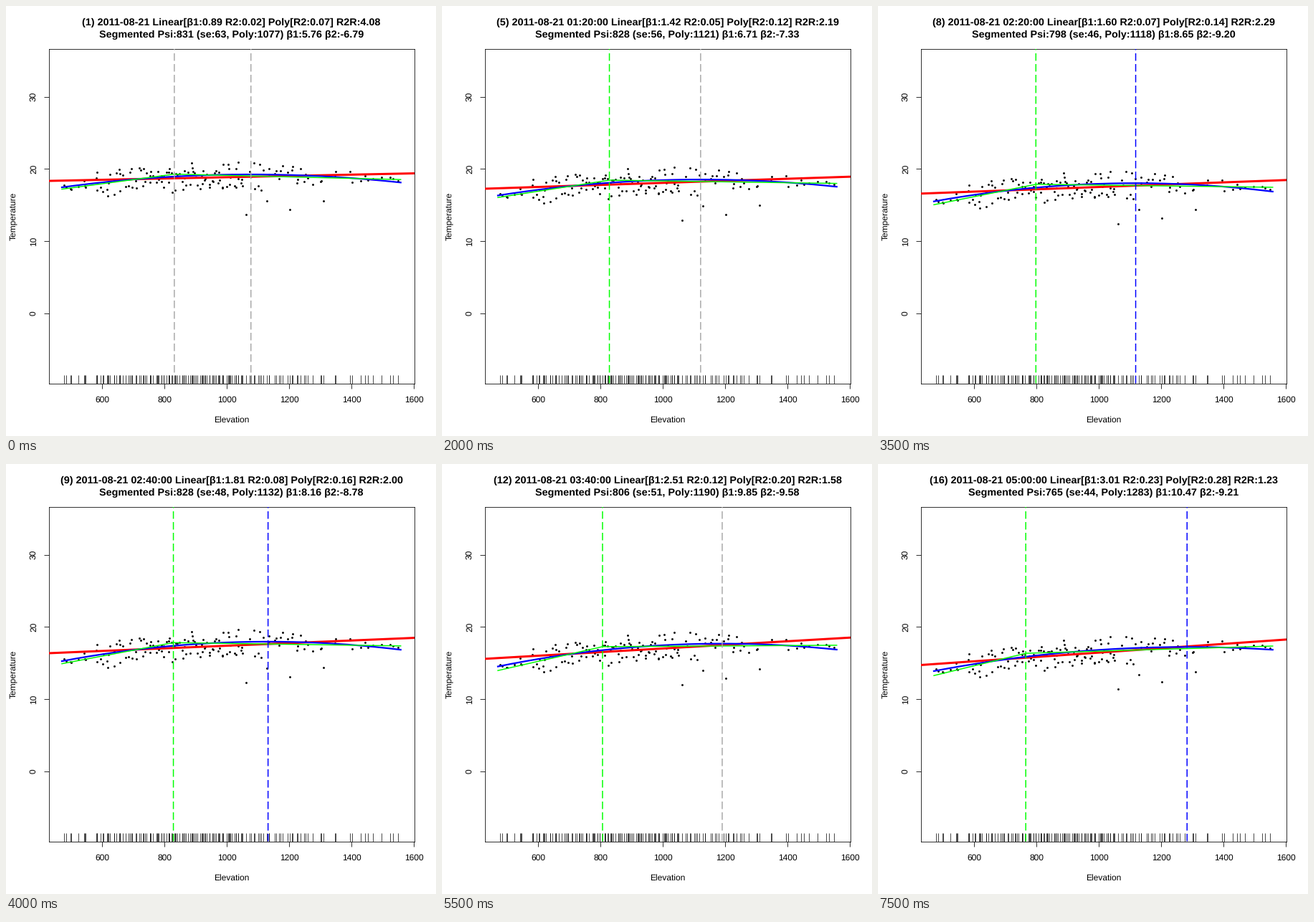
A matplotlib script for the animation above (8 s loop, 600 px wide and 600 px high).

```python
import numpy as np
import matplotlib.pyplot as plt
from matplotlib.animation import FuncAnimation

PT = 0.72                          # points per pixel at 100 dpi
L, R, T, B = 59.5, 569.5, 59.5, 526.5
W, H = R - L, B - T
STEPS = 16
CENTER, SPREAD = 985, 272          # where the two smooth fits balance

plt.rcParams["font.family"] = ["Liberation Sans", "DejaVu Sans"]
plt.rcParams["text.hinting"] = "none"

# Fit results: step, level, linear slope, R2, poly R2, R2R,
# psi, se, poly vertex, first slope, change of slope
FITS = np.array([
    [1, 18.84, 0.89, .02, .07, 4.08, 831, 63, 1077, 5.76, -6.79],
    [5, 18.05, 1.42, .05, .12, 2.19, 828, 56, 1121, 6.71, -7.33],
    [7, 17.58, 1.39, .05, .12, 2.57, 767, 43, 1104, 9.14, -9.61],
    [9, 17.37, 1.81, .08, .16, 2.00, 828, 48, 1132, 8.16, -8.78],
    [11, 17.16, 2.25, .12, .22, 1.75, 766, 38, 1154, 11.08, -10.93],
    [14, 16.61, 3.02, .13, .17, 1.25, 886, 77, 1263, 7.38, -6.89],
    [16, 16.40, 3.01, .23, .28, 1.23, 765, 44, 1283, 10.47, -9.21],
])

# Stations crowd the middle elevations; each keeps its own deviation
rng = np.random.default_rng(21)
count = 150
rank = np.linspace(0, 1, count) + rng.uniform(-1, 1, count) / count
elev = np.interp(rank, [0, .06, .25, .7, .8, .9, 1],
                 [470, 580, 748, 1045, 1150, 1270, 1558])
taper = np.interp(elev, [470, 560, 1150, 1300, 1560], [.2, 1, 1, .6, .35])
deviation = taper * (4.2 * rng.beta(1.8, 1.5, count) - 2.3)

# The cold spots
for e, d in [(1061, -5.6), (1202, -4.8), (1128, -3.7), (1310, -3.4), (1110, -2.2)]:
    i = np.argmin(abs(elev - e))
    elev[i], deviation[i] = e, d


def linear_fit(e, level, slope):
    return level + slope * (e - CENTER) / 1000


def poly_fit(e, level, slope, vertex):
    bend = slope / 2000 / (vertex - CENTER)
    return linear_fit(e, level, slope) + bend * (SPREAD ** 2 - (e - CENTER) ** 2)


def segmented_fit(e, level, slope, psi, b1, b2):
    def shape(x):
        return (b1 * (x - psi) + b2 * np.maximum(x - psi, 0)) / 1000
    return shape(e) + np.mean(linear_fit(elev, level, slope) - shape(elev))


fig = plt.figure(figsize=(6, 6), dpi=100, facecolor="white")
ax = fig.add_axes([L / 600, 1 - B / 600, W / 600, H / 600])
ax.set_xlim(427.4, 1601.2)
ax.set_ylim(-9.715, 36.675)
ax.set_xticks(range(600, 1601, 200))
ax.set_yticks(range(0, 31, 10))
ax.tick_params(length=7.2 * PT, width=0.8 * PT, labelbottom=False, labelleft=False)
for spine in ax.spines.values():
    spine.set_linewidth(0.8 * PT)

along_x, along_y = ax.get_xaxis_transform(), ax.get_yaxis_transform()


def label(x, y, s="", size=12, transform=ax.transAxes, **kw):
    return ax.text(x, y, s, fontsize=size * PT, transform=transform, ha="center",
                   va="baseline", rotation_mode="anchor", **kw)


def line(color, width):
    return ax.plot([], [], color=color, lw=width * PT, zorder=3, snap=False)[0]


def marker_line():
    return ax.axvline(0, lw=1.5 * PT, ls=(0, (7, 3)), dash_capstyle="butt",
                      zorder=4, snap=False)


for e in ax.get_xticks():
    label(e, -26 / H, f"{e:.0f}", transform=along_x)
for t in ax.get_yticks():
    label(-17.7 / W, t, f"{t:.0f}", transform=along_y, rotation=90)
label(.5, -54.8 / H, "Elevation")
label(-45.9 / W, .5, "Temperature", rotation=90)
title = [label(.5, 1 + up / H, size=14.4, weight="bold") for up in (32.5, 15.2)]

ax.vlines(elev, 0, .025, transform=along_x, color="black", lw=0.7 * PT)
dots = ax.plot([], [], "o", color="black", ms=2.9 * PT, mew=0, zorder=2)[0]
linear, poly, segmented = line("#ff0000", 3), line("#0000ff", 2.25), line("#00ff00", 1.5)
psi_line, vertex_line = marker_line(), marker_line()
span = np.linspace(470, 1558, 200)


def draw(i):
    step = i + 1
    level, slope, r2, pr2, r2r, psi, se, vertex, b1, b2 = (
        np.interp(step, FITS[:, 0], col) for col in FITS.T[1:])

    x, y = elev, poly_fit(elev, level, slope, vertex) + deviation
    if step == 14:                 # one faulty reading
        x, y = np.append(x, 747), np.append(y, -0.4)
    dots.set_data(x, y)

    ends = np.array(ax.get_xlim())
    linear.set_data(ends, linear_fit(ends, level, slope))
    poly.set_data(span, poly_fit(span, level, slope, vertex))
    segmented.set_data(span, segmented_fit(span, level, slope, psi, b1, b2))

    # Markers light up as the break point gets more certain
    psi_line.set_xdata([psi, psi])
    psi_line.set_color("#00ff00" if se < 60 else "#a9a9a9")
    vertex_line.set_xdata([vertex, vertex])
    vertex_line.set_color("#0000ff" if se < 50 else "#a9a9a9")

    clock = f" {i // 3:02d}:{i % 3 * 20:02d}:00" if i else ""
    title[0].set_text(f"({step}) 2011-08-21{clock} Linear[β1:{slope:.2f} R2:{r2:.2f}] "
                      f"Poly[R2:{pr2:.2f}] R2R:{r2r:.2f}")
    title[1].set_text(f"Segmented Psi:{psi:.0f} (se:{se:.0f}, Poly:{vertex:.0f}) "
                      f"β1:{b1:.2f} β2:{b2:.2f}")
    return [dots, linear, poly, segmented, psi_line, vertex_line, *title]


anim = FuncAnimation(fig, draw, frames=STEPS, interval=500, repeat=True, repeat_delay=0)
plt.show()
```
